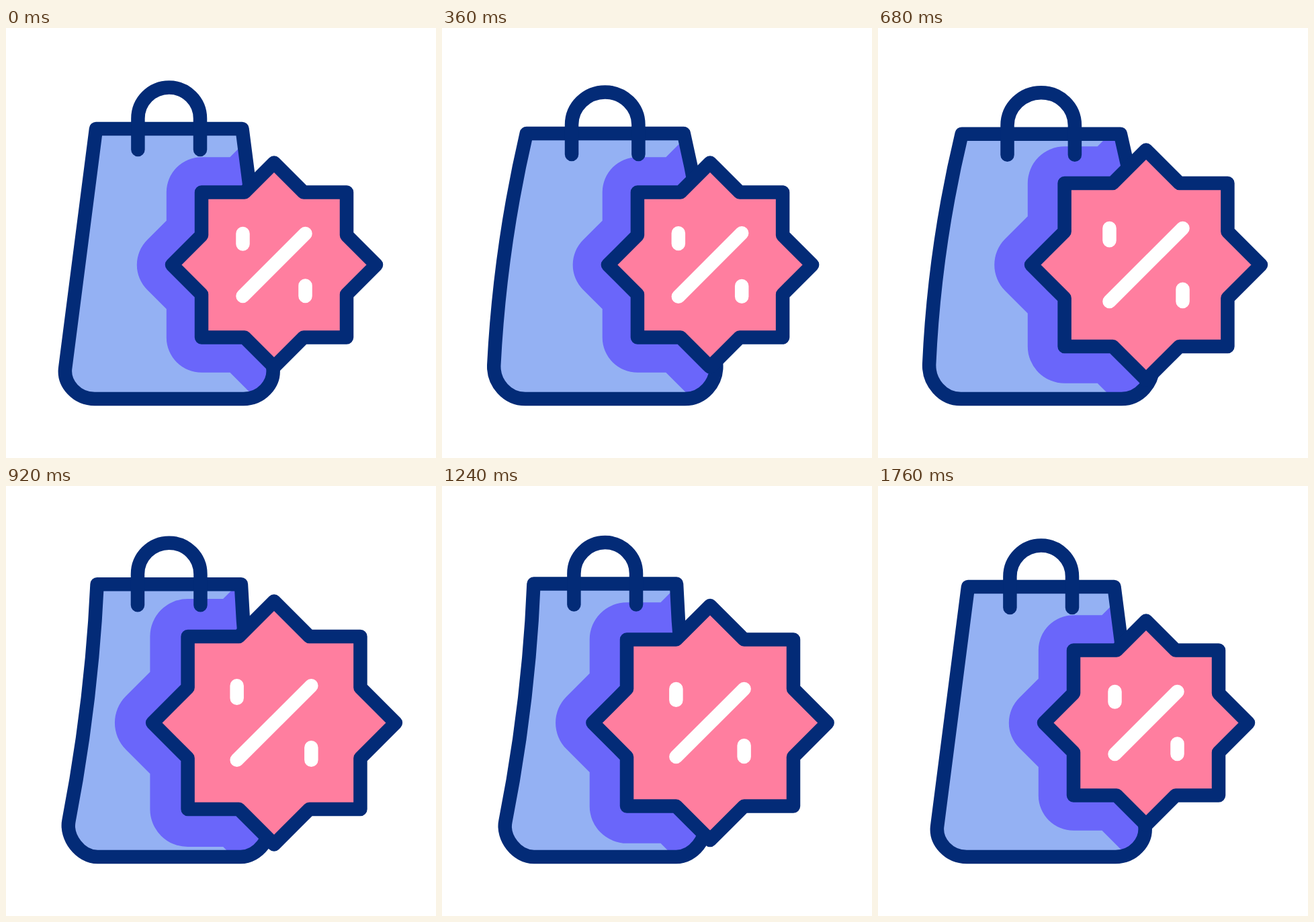
These frames come from a looping animation (640 by 640 pixels, 2000 ms). An HTML page:

```html
<!DOCTYPE html>
<html lang="en">
<head>
<meta charset="utf-8">
<title>Shopping bag discount</title>
<style>
  html, body { margin: 0; width: 100%; height: 100%; overflow: hidden; background: #fff; }
  svg { display: block; width: 100%; height: 100%; }

  path {
    fill: none;
    stroke: #032b77;
    stroke-width: 20.5;
    stroke-linecap: round;
    stroke-linejoin: round;
    animation: 2s cubic-bezier(.6, 0, .4, 1) infinite;
  }
  .bag { animation-name: bag; }
  .handle { animation-name: handle; }
  .star { animation-name: star; fill: #ff7e9f; }
  .percent { animation-name: percent; stroke: #fff; }
  .body { fill: #94b1f3; stroke: none; }
  .shadow { animation-name: star, spread; fill: #6a66fa; stroke: #6a66fa; }

  /* The bag squashes, stretches and settles. */
  @keyframes bag {
    0%, 80%, 100% { d: path("M134 150Q111 328 88.2 506C85.1 530 106 552 132 552H353.5C379.5 552 400.4 530 397.3 506Q374.5 328 351.5 150Z"); }
    28% { d: path("M123.7 158.7Q80 328 74.6 500C73.8 528 95 552 122 552H363.5C390.5 552 411.7 528 410.9 500Q405.5 328 361.8 158.7Z"); }
    53% { d: path("M137 144.7Q133 322 95.7 498C90.5 522 112 552 138 552H347.5C373.5 552 395 522 389.8 498Q352.5 322 348.5 144.7Z"); }
  }
  @keyframes handle {
    0%, 80%, 100% { d: path("M196.4 181V134.8A46.3 46.3 0 0 1 289 134.8V181"); }
    28% { d: path("M192.2 189.8V146.2A50.5 49 0 0 1 293.2 146.2V189.8"); }
    53% { d: path("M196.4 175.7V129.5A46.3 46.3 0 0 1 289 129.5V175.7"); }
  }

  /* The badge grows while its line weight stays the same. */
  @keyframes star {
    0%, 16%, 86%, 100% { d: path("M0-152l44 44h64v64l44 44l-44 44v64h-64l-44 44l-44-44h-64v-64l-44-44l44-44v-64h64z"); }
    48% { d: path("M0-181l52.5 52.5h76v76l52.5 52.5l-52.5 52.5v76h-76l-52.5 52.5l-52.5-52.5h-76v-76l-52.5-52.5l52.5-52.5v-76h76z"); }
  }
  @keyframes spread {
    0%, 16%, 86%, 100% { stroke-width: 104.4; }
    48% { stroke-width: 112.4; }
  }
  @keyframes percent {
    0%, 10%, 80%, 100% { d: path("M-46.5 46.5L46.5-46.5M-46.5-46.5v15.5M46.5 31v15.5"); }
    43% { d: path("M-55.4 55.4L55.4-55.4M-55.4-55.4v18.5M55.4 36.9v18.5"); }
  }
</style>
</head>
<body>
<svg viewBox="0 0 640 640">
  <clipPath id="inside"><path class="bag"/></clipPath>
  <path class="bag body"/>
  <g clip-path="url(#inside)">
    <g transform="translate(399 352.5)"><path class="shadow"/></g>
  </g>
  <path class="bag"/>
  <path class="handle"/>
  <g transform="translate(399 352.5)">
    <path class="star"/>
    <path class="percent"/>
  </g>
</svg>
</body>
</html>
```
